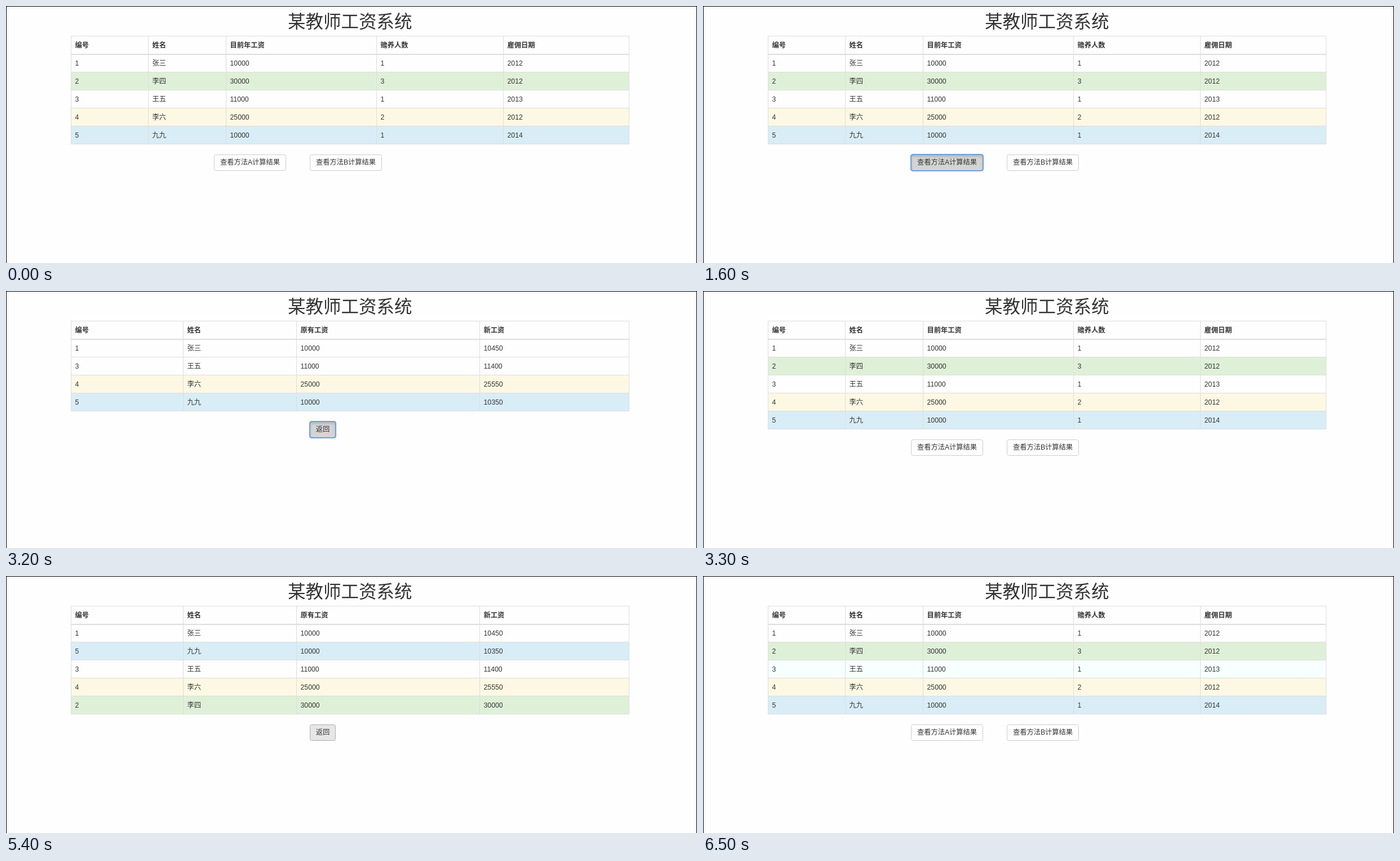
Animation of 1226x457 px, one loop 7300 ms. Source, as an HTML page:

```html
<!DOCTYPE html>
<html lang="zh-CN">
<head>
<meta charset="utf-8">
<title>某教师工资系统</title>
<style>
html, body { margin: 0; width: 100%; height: 100%; overflow: hidden; background: #fefefe; }
body { font: 12.25px/17.5px "Liberation Sans", Arial, "Noto Sans CJK SC", "Noto Sans CJK", sans-serif; color: #333; }
#stage { position: absolute; left: 0; top: 0; width: 1226px; height: 457px; overflow: hidden; }
#stage div { position: absolute; box-sizing: border-box; white-space: nowrap; }
#stage .frame { inset: 0; border: 1px solid #000; border-bottom: 0; }
#stage .title { left: 500px; top: 10px; font-size: 31.5px; font-weight: 350; line-height: 36px; }
.page { left: 0; top: 0; visibility: hidden; }
.page.on { visibility: visible; }
.line { background: #ddd; }
.head { font-weight: bold; }
.plain.hover { background: #f7ffff; }
.success { background: #dff0d8; }
.warning { background: #fcf8e3; }
.warning.hover { background: #faf2cc; }
.info { background: #d9edf7; }
.info.hover { background: #c4e3f3; }
.btn { height: 29px; padding-top: 5px; text-align: center; background: #fefefe; border: 1px solid #ccc; border-radius: 3.5px; }
.btn.hover { background: #e6e6e6; border-color: #adadad; }
.btn.focus, .btn.press { background: #e6e6e6; border-color: #8c8c8c; outline: 2px solid #6ba0e2; outline-offset: -1px; }
.btn.press { background: #d4d4d4; box-shadow: inset 0 3px 4px rgba(0, 0, 0, .14); }
</style>
</head>
<body>
<div id="stage">
  <div class="title">某教师工资系统</div>
  <div class="frame"></div>
</div>
<script>
const LOOP = 7300, TOP = 53, ROW = 32, RIGHT = 1105;
const stage = document.getElementById('stage');

const staff = {
  1: { name: '张三', pay: 10000, kids: 1, year: 2012, next: 10450, tone: 'plain' },
  2: { name: '李四', pay: 30000, kids: 3, year: 2012, next: 30000, tone: 'success' },
  3: { name: '王五', pay: 11000, kids: 1, year: 2013, next: 11400, tone: 'plain' },
  4: { name: '李六', pay: 25000, kids: 2, year: 2012, next: 25550, tone: 'warning' },
  5: { name: '九九', pay: 10000, kids: 1, year: 2014, next: 10350, tone: 'info' }
};

function add(parent, cls, x, y, w, h, text) {
  const el = document.createElement('div');
  el.className = cls;
  el.style.left = x + 'px';
  el.style.top = y + 'px';
  if (w) el.style.width = w + 'px';
  if (h) el.style.height = h + 'px';
  if (text !== undefined) el.textContent = text;
  parent.appendChild(el);
  return el;
}

function makePage(cols, heads, fields, ids, buttons) {
  const root = add(stage, 'page', 0, 0);
  const bottom = TOP + ROW * (ids.length + 1);
  const rows = {};
  const texts = (cls, y, values) =>
    values.forEach((v, i) => add(root, cls, cols[i] + 7.5, y + 9, 0, 0, v));

  ids.forEach((id, i) => {
    const y = TOP + ROW * (i + 1);
    rows[id] = add(root, staff[id].tone, cols[0] + 1, y + 1, RIGHT - cols[0] - 1, ROW - 1);
    texts('cell', y, [id, ...fields.map(f => staff[id][f])]);
  });
  texts('head', TOP, heads);

  for (let i = 0; i <= ids.length + 1; i++)
    add(root, 'line', cols[0], TOP + ROW * i, RIGHT - cols[0] + 1, i === 1 ? 2 : 1);
  [...cols, RIGHT].forEach(x => add(root, 'line', x, TOP, 1, bottom - TOP + 1));

  const btns = buttons.map(([x, w, label]) => add(root, 'btn', x, bottom + 19, w, 29, label));
  return { root, rows, btns };
}

const resultCols = [115, 314, 515, 840];
const resultHeads = ['编号', '姓名', '原有工资', '新工资'];
const resultFields = ['name', 'pay', 'next'];
const back = [[539, 46, '返回']];

const pages = {
  main: makePage([115, 252, 390, 657, 882],
    ['编号', '姓名', '目前年工资', '赡养人数', '雇佣日期'],
    ['name', 'pay', 'kids', 'year'], [1, 2, 3, 4, 5],
    [[369, 128, '查看方法A计算结果'], [539, 128, '查看方法B计算结果']]),
  a: makePage(resultCols, resultHeads, resultFields, [1, 3, 4, 5], back),
  b: makePage(resultCols, resultHeads, resultFields, [1, 5, 3, 4, 2], back)
};

// start time, page, part kind, part index, part state
const steps = [
  [0, 'main'],
  [300, 'main', 'rows', 5, 'hover'],
  [700, 'main'],
  [1000, 'main', 'btns', 0, 'hover'],
  [1600, 'main', 'btns', 0, 'press'],
  [1700, 'a'],
  [2500, 'a', 'btns', 0, 'hover'],
  [3200, 'a', 'btns', 0, 'press'],
  [3300, 'main'],
  [3800, 'main', 'btns', 1, 'hover'],
  [4400, 'main', 'btns', 1, 'press'],
  [4500, 'main', 'btns', 1, 'focus'],
  [4600, 'b'],
  [5100, 'b', 'btns', 0, 'hover'],
  [5200, 'b'],
  [5400, 'b', 'btns', 0, 'hover'],
  [6100, 'b', 'btns', 0, 'press'],
  [6200, 'main'],
  [6300, 'main', 'rows', 5, 'hover'],
  [6400, 'main', 'rows', 4, 'hover'],
  [6500, 'main', 'rows', 3, 'hover']
];

let current, active;

function show(step) {
  if (step === current) return;
  current = step;
  const [, name, kind, index, state] = step;
  for (const key in pages) pages[key].root.classList.toggle('on', key === name);
  if (active) active.classList.remove('hover', 'press', 'focus');
  active = kind ? pages[name][kind][index] : null;
  if (active) active.classList.add(state);
}

const start = performance.now();
function tick() {
  const t = (performance.now() - start) % LOOP;
  show(steps.findLast(s => s[0] <= t) || steps[0]);
  requestAnimationFrame(tick);
}
tick();
</script>
</body>
</html>
```
